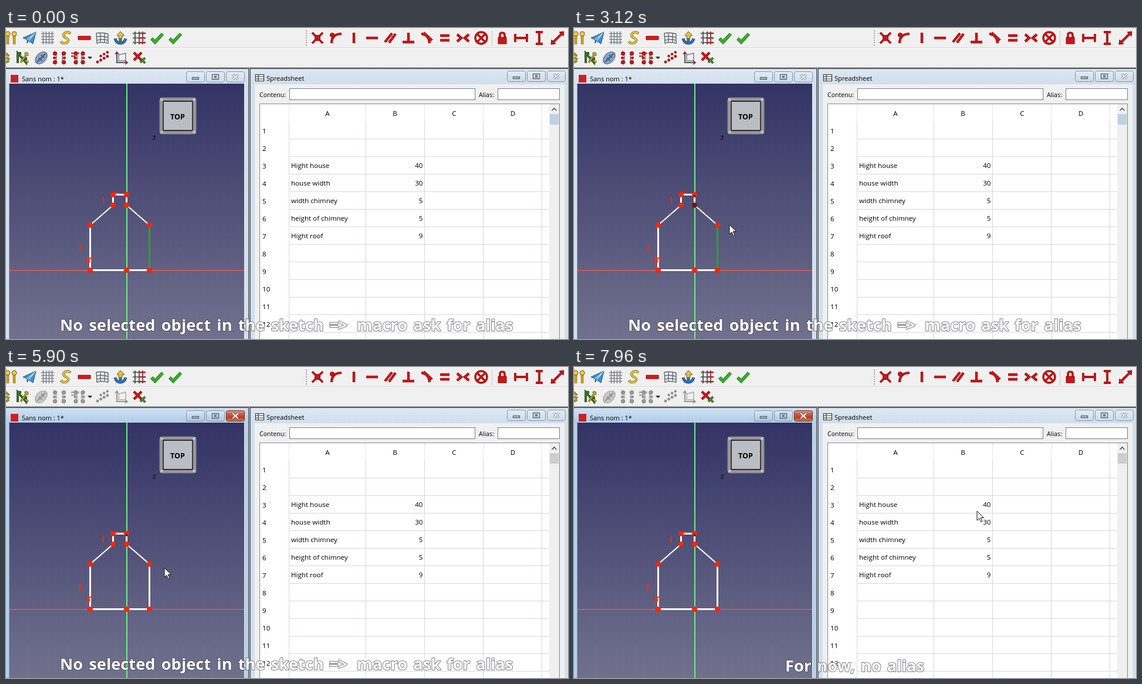
An HTML page with a canvas for the animation above (8 s loop, 958 by 531 pixels).

```html
<!DOCTYPE html>
<html lang="en">
<head>
<meta charset="utf-8">
<title>Sketch and spreadsheet</title>
<style>
html, body { margin: 0; width: 100%; height: 100%; overflow: hidden; background: #f0f0f0; }
canvas { display: block; width: 958px; height: 531px; }
</style>
</head>
<body>
<canvas id="stage" width="958" height="531"></canvas>
<script>
const g = document.getElementById('stage').getContext('2d');
const LOOP = 8000, STEP = 66.33;
const UI = '"Open Sans", "Noto Sans", sans-serif';
const RED = '#d01414', DARK = '#8a0808', EDGE = '#4a525c';

// Steps at which the state changes
const SELECT = 29, ACTIVATE = 48, DISABLE = 51, RELEASE = 69, CAPTION = 108;

// Pointer path: step, x, y
const PATH = [
  [7, 811, 501], [10, 560, 440], [14, 290, 385], [17, 233, 366], [20, 233, 366],
  [21, 234, 367], [24, 215, 330], [27, 190, 300], [29, 205, 303], [31, 240, 308],
  [33, 306, 318], [35, 342, 328], [38, 300, 268], [41, 262, 340], [43, 275, 428],
  [46, 265, 336], [61, 265, 336], [62, 265, 335], [66, 215, 310], [68, 203, 303],
  [70, 165, 330], [72, 240, 400], [74, 279, 428], [75, 275, 446], [76, 270, 435],
  [79, 262, 404], [82, 254, 338], [84, 254, 345], [88, 254, 345], [89, 270, 343],
  [93, 450, 300], [97, 650, 262], [100, 724, 260], [101, 724, 260], [104, 690, 248],
  [110, 600, 229], [114, 578, 233], [115, 571, 232], [118, 640, 238], [120, 687, 246]
];

function slope(i, c) {
  const a = PATH[i - 1], b = PATH[i], d = PATH[i + 1];
  if (!a || !d) return 0;
  if ((b[c] - a[c]) * (d[c] - b[c]) <= 0) return 0;
  return (d[c] - a[c]) / (d[0] - a[0]);
}

function pointer(k) {
  if (k < PATH[0][0]) return null;
  let i = 0;
  while (i < PATH.length - 2 && PATH[i + 1][0] <= k) i++;
  const a = PATH[i], b = PATH[i + 1], h = b[0] - a[0];
  const u = Math.min(1, (k - a[0]) / h), v = 1 - u;
  return [1, 2].map(c =>
    a[c] * (1 + 2 * u) * v * v + b[c] * u * u * (3 - 2 * u) +
    h * u * v * (slope(i, c) * v - slope(i + 1, c) * u));
}

function box(x, y, w, h, fill, edge) {
  if (fill) { g.fillStyle = fill; g.fillRect(x, y, w, h); }
  if (edge) { g.strokeStyle = edge; g.lineWidth = 1; g.strokeRect(x + .5, y + .5, w - 1, h - 1); }
}

function shade(y0, y1, ...colors) {
  const s = g.createLinearGradient(0, y0, 0, y1);
  colors.forEach((c, i) => s.addColorStop(i / (colors.length - 1), c));
  return s;
}

function text(s, x, y, size = 11.6, align = 'left', font = UI, weight = 400) {
  g.font = `${weight} ${size}px ${font}`;
  g.textAlign = align;
  g.fillStyle = '#000';
  g.fillText(s, x, y);
}

function dot(x, y, r, fill, edge) {
  g.beginPath();
  g.arc(x, y, r, 0, 7);
  g.fillStyle = fill;
  g.fill();
  if (edge) { g.strokeStyle = edge; g.lineWidth = 1; g.stroke(); }
}

// Stroke a path around a centre, with an optional darker rim
function pen(x, y, d, color, w, rim) {
  const p = new Path2D(d);
  g.save();
  g.translate(x, y);
  if (rim) { g.strokeStyle = rim; g.lineWidth = w + 1.4; g.stroke(p); }
  g.strokeStyle = color;
  g.lineWidth = w;
  g.stroke(p);
  g.restore();
}

function solid(x, y, d, fill, edge) {
  const p = new Path2D(d);
  g.save();
  g.translate(x, y);
  g.fillStyle = fill;
  g.fill(p);
  if (edge) { g.strokeStyle = edge; g.lineWidth = 1; g.stroke(p); }
  g.restore();
}

const red = (x, d, w = 3) => pen(x, 17, d, RED, w, DARK);

function topTools() {
  for (const x of [3, 14]) {
    pen(x, 17, 'M0-4V11', '#d9a520', 3, '#7a5a10');
    dot(x, 10, 4, '#f0c84a', '#7a5a10');
  }
  solid(40, 17, 'M-11 0L11-10L6 10L-1 5L-4 9L-4 3Z', '#3c8fd0', '#1c4f80');
  pen(40, 17, 'M-4 3L8-7L-1 5', '#d8ecfa', 1.2);
  pen(71, 17, 'M-7.5-11V11M-2.5-11V11M2.5-11V11M7.5-11V11M-11-7.5H11M-11-2.5H11M-11 2.5H11M-11 7.5H11', '#7c828c', 1.5);
  pen(102, 17, 'M8-7C4-12-5-9-4-4C-3 1 6 0 4 5C2 10-6 10-9 6', '#e8c430', 2.6, '#6a5410');
  solid(133, 17, 'M-10-3H11V3H-10Z', '#e01818', DARK);
  pen(164, 17, 'M-10-8Q0-10 10-7V9Q0 6-9 9ZM-10-2Q0-4 10-1M-9 4Q0 1 10 4M-3-9V7M4-9V7', '#5f6670', 1.4);
  pen(195, 17, 'M-9 1Q-7 9 0 9Q7 9 9 1M0-2V8', '#2f6fb0', 3.5, '#173a60');
  solid(195, 17, 'M0-11L7-4H3V1H-3V-4H-6Z', '#e8bc40', '#7a5a10');
  pen(227, 17, 'M-11-8H10M-11 0H10M-11 8H10M-7-11V11M0-11V11M6-11V11', '#444', 1.7);
  pen(227, 17, 'M0-8H11M0 0H11M0 8H11', '#d01818', 2.6);
  for (const x of [257, 288]) pen(x, 17, 'M-9 1L-3 7L10-7', '#32b422', 4, '#125c0c');

  for (let y = 4; y < 31; y += 4) box(511, y, 2, 2, '#a8a8a8');
  red(531, 'M-9-9L9 9M9-9L-9 9', 2.2); dot(531, 17, 4.6, RED, DARK);
  red(562, 'M-7 9Q-7-7 10-7', 2.8); dot(556, 12, 3.6, RED, DARK);
  red(593, 'M0-9V9');
  red(624, 'M-10 0H10');
  red(655, 'M-9 7L3-8M-2 8L9-7');
  red(686, 'M-10 7H10M0 7V-9');
  red(717, 'M-9-7Q4-6 5 9M-5-9L9 4');
  red(748, 'M-8-4H8M-8 4H8');
  red(779, 'M-10-6L-3 0L-10 6M10-6L3 0L10 6');
  red(810, 'M10 0A10 10 0 1 1-10 0A10 10 0 1 1 10 0M-6-6L6 6M6-6L-6 6', 2);
  box(828, 5, 1, 25, '#c8c8c8');
  red(846, 'M-4-1V-5Q-4-9 0-9Q4-9 4-5V-1', 2.2);
  solid(846, 17, 'M-7-1H7V10H-7Z', RED, DARK);
  red(878, 'M-10-7V7M10-7V7M-9 0H9', 2.4);
  red(909, 'M-6-10H6M-6 10H6M0-9V9', 2.4);
  red(940, 'M-8 8L8-8', 2.6);
  solid(940, 17, 'M11-11L10-3L3-10ZM-11 11L-10 3L-3 10Z', RED, DARK);
}

function lowTools(off) {
  const y = 51, a = off ? '#9a9a9a' : RED, line = off ? '#aaa' : '#777', rim = off ? '#808080' : DARK;
  pen(-1, y, 'M0-8L6-3M0 0L7 2M0 8L6 5', '#b49a28', 2.4, '#4a5010');
  pen(28, y, 'M-8 9V-8L6 8V-1M-8-8H-2', '#2c7c20', 2.4, '#1c3410');
  pen(28, y, 'M-3 8L9-9M4-9L10-4M5 4L10 8', '#d8a82c', 2, '#4a4a14');
  g.save();
  g.translate(60, y);
  g.rotate(-.8);
  g.scale(1, .68);
  dot(0, 0, 12, off ? '#c8c8c8' : '#8ca4c4', off ? '#8c8c8c' : '#344c70');
  g.restore();
  pen(60, y, 'M-7 7L7-7M-4 0L2 5M0-5L5 0', off ? '#909090' : '#3e5880', 2);
  const stack = (x, dx) => {
    for (const s of [-1, 1]) {
      pen(x + s * dx, y, `M0-8Q${-s * 5} 0 0 8`, line, 1.6);
      for (const v of [-7.5, 7.5]) dot(x + s * dx, y + v, 3.2, a, rim);
      dot(x + s * (dx + 1), y, 2, a, rim);
    }
  };
  stack(91, 7.5);
  stack(125, 6);
  pen(118, y, 'M-7-8H7M-7-3H0', a, 2);
  solid(143, y, 'M-4-2H4L0 2Z', '#222');
  for (let i = 0; i < 4; i++) {
    dot(156 + i * 5.6, 58 - i * 3.2, 2, a, rim);
    if (i) dot(156 + i * 5.6, 51 - i * 3.2, 1.8, a, rim);
  }
  pen(196, y, 'M-7-9V8H10', off ? '#999' : '#555', 2);
  pen(196, y, 'M-4 5V-5L8-8V5Z', off ? '#aaa' : '#6f8098', 1.5);
  pen(196, y, 'M-10-6L-7-10L-4-6M7 5L11 8L7 11', a, 1.8);
  pen(227, y, 'M-9-9L4 4M4-9L-9 4', RED, 3, DARK);
  pen(229, y, 'M0 8L8 0M2 2L8 9', '#3c9428', 2.2, '#1c4410');
}

function buttons(x, y, hot) {
  const glyph = ['M-5 1H6V4H-5Z', 'M-5-4H6V4H-5ZM-1-1H2V1H-1Z', 'M-4-4L5 4M5-4L-4 4'];
  glyph.forEach((d, i) => {
    const bx = x + i * 34, closing = hot && i === 2;
    g.beginPath();
    g.roundRect(bx + .5, y + .5, 31, 18, 3);
    g.fillStyle = closing ? shade(y, y + 18, '#e0a594', '#c9604a', '#b84026', '#d07a58')
      : hot ? shade(y, y + 18, '#dbe9f6', '#aec8e2') : shade(y, y + 18, '#e4edf6', '#cedcea');
    g.fill();
    g.strokeStyle = closing ? '#6a2a20' : '#8496ab';
    g.lineWidth = 1;
    g.stroke();
    if (i === 2) pen(bx + 15.5, y + 9.5, d, closing ? '#fff' : '#f8fafc', 2.2, '#59626e');
    else pen(bx + 15.5, y + 9.5, d, '#59626e', 1.3);
  });
}

function sketch(k, p) {
  g.save();
  g.beginPath();
  g.rect(6, 95, 400, 436);
  g.clip();
  box(6, 95, 400, 436, shade(95, 531, '#333365', '#71718e'));

  const inside = p && p[0] < 406;
  const overX = inside && Math.abs(p[1] - 413) < 4, overY = inside && Math.abs(p[0] - 205) < 4;
  box(6, 413, 400, 1.7, overX ? '#e1e114' : '#d85a58');
  box(205, 95, 2, 436, overY ? '#e1e114' : '#6cf084');

  solid(293, 150, 'M-27-31H27L31-27V27L27 31H-27L-31 27V-27Z', '#98989c', '#85858a');
  pen(293, 150, 'M-30-30L-25-25M30-30L25-25M-30 30L-25 25M30 30L25 25', '#c8c8cc', 3);
  box(267, 124, 52, 52, '#bcbcc4');
  pen(293, 150, 'M-25-25H25V25H-25Z', '#2c2c30', 1.8);
  g.fontStretch = 'condensed';
  text('TOP', 292.5, 155.5, 12.5, 'center', '"Noto Sans", Roboto, sans-serif', 700);
  g.fontStretch = 'normal';
  text('z', 252.5, 190.5, 12, 'center');

  pen(.5, .5, 'M244 413H143V336M182 302V284H205V302', '#fff', 3);
  pen(.5, .5, 'M143 336L182 302M205 302L244 336', '#fff', 2.2);
  pen(244.5, 0, 'M0 336V413', k < ACTIVATE ? '#2ca02c' : '#fff', 3);

  const dots = [[143, 413], [205, 413], [244, 413], [244, 336], [205, 284], [182, 284], [182, 302], [143, 336]];
  for (const [x, y] of dots) dot(x + .5, y + .5, 4.6, '#ff2400');
  dot(205.5, 302.5, 4.6, k >= SELECT && k < RELEASE ? '#741810' : '#ff2400');
  if (k >= SELECT) box(204, 285, 3, 4, '#741810');

  pen(0, 0, 'M165.5 288V300M126.5 370V382', '#e83010', 2);
  pen(0, 0, 'M183 282H193M137 393H149M141 394V402', '#f02c0c', 2);
  dot(140, 398, 3.2, '#e83010');
  g.restore();
}

function leftWindow(k, p) {
  const hot = k >= ACTIVATE, frame = hot ? '#b4d0ea' : '#d3e0ee';
  box(0, 69, 413, 462, frame);
  box(0, 70, 413, 25, hot ? shade(70, 95, '#cfe1f2', '#b2cde8') : shade(70, 95, '#dee8f3', frame));
  box(0, 69, 414, 1, EDGE);
  box(413, 69, 1, 462, EDGE);
  box(5, 95, 1, 436, '#8796a6');
  box(406, 95, 1, 436, '#e8f0f8');
  box(8, 80, 13, 13, '#d02020');
  text('Sans nom : 1*', 27, 91, 11.05);
  buttons(307, 74, hot);
  sketch(k, p);
}

function rightWindow(k) {
  box(416, 69, 542, 462, '#d3e0ee');
  box(416, 69, 542, 27, shade(69, 96, '#dee8f3', '#d0deec'));
  box(416, 69, 542, 1, EDGE);
  box(416, 69, 1, 462, EDGE);
  box(424, 96, 528, 435, '#f0f0f0');
  box(425, 79, 15, 12, '#fff');
  pen(425, 79, 'M0 .5H15M0 4H15M0 8H15M0 11.5H15M.5 0V12M5 0V12M14.5 0V12', '#333', 1.2);
  text('Spreadsheet', 444, 90, 11);
  buttons(854, 73, false);
  text('Contenu:', 432, 118, 10.6);
  box(483, 103, 317, 20, '#fff', '#747c88');
  text('Alias:', 806, 118, 10.6);
  box(838, 103, 106, 20, '#fff', '#747c88');

  box(432, 129, 512, 410, '#fff', '#828790');
  for (const x of [482, 613, 713, 813, 913]) {
    box(x, 130, 1, 30, '#e4e6e8');
    box(x, 160, 1, 371, '#d2d6da');
  }
  for (let r = 1; r <= 12; r++) {
    box(482, 159 + r * 30, 444, 1, '#d8d8d8');
    text(r, 437, 149.5 + r * 30);
  }
  [...'ABCD'].forEach((c, i) => text(c, [548, 663, 764, 864][i], 149.5, 11.6, 'center'));
  const rows = [['Hight house', 40], ['house width', 30], ['width chimney', 5], ['height of chimney', 5], ['Hight roof', 9]];
  rows.forEach(([name, value], i) => {
    text(name, 486, 239 + i * 30);
    text(value, 710.5, 239 + i * 30, 11.6, 'right');
  });
  box(926, 130, 17, 401, '#f0f0f0');
  box(927, 147, 15, 18, k < ACTIVATE ? '#bfd0e0' : '#cdcdcd');
  pen(934.5, 139, 'M-4 2L0-2L4 2', '#505050', 1.6);
}

function caption(s, x, y) {
  g.font = `700 27.3px ${UI}`;
  g.textAlign = 'left';
  g.wordSpacing = '3px';
  g.lineJoin = 'round';
  g.strokeStyle = 'rgba(60,60,70,.65)';
  g.lineWidth = 2;
  g.strokeText(s, x, y);
  g.fillStyle = '#fff';
  g.fillText(s, x, y);
  g.wordSpacing = '0px';
  g.lineJoin = 'miter';
}

function draw(k) {
  const p = pointer(k);
  box(0, 0, 958, 531, '#f0f0f0');
  box(0, 33, 958, 1, '#d4d4d4');
  box(0, 34, 958, 1, '#fbfbfb');
  box(0, 67, 958, 464, '#a0a0a0');
  box(0, 68, 958, 1, '#696969');
  topTools();
  lowTools(k >= DISABLE);
  leftWindow(k, p);
  rightWindow(k);
  if (p) solid(p[0], p[1], 'M0 0V16L3.8 12.5L6.6 18.6L9 17.5L6.2 11.5H11.4Z', '#fff', '#111');
  if (k < CAPTION) {
    caption('No selected object in the sketch', 92, 516.5);
    caption('=>', 551, 516.5);
    caption('macro ask for alias', 598, 516.5);
  } else {
    caption('For now, no alias', 360, 520);
  }
}

let last = -1;
function tick(now) {
  const k = Math.floor((now % LOOP + 5) / STEP);
  if (k !== last) draw(last = k);
  requestAnimationFrame(tick);
}
draw(0);
requestAnimationFrame(tick);
</script>
</body>
</html>
```
